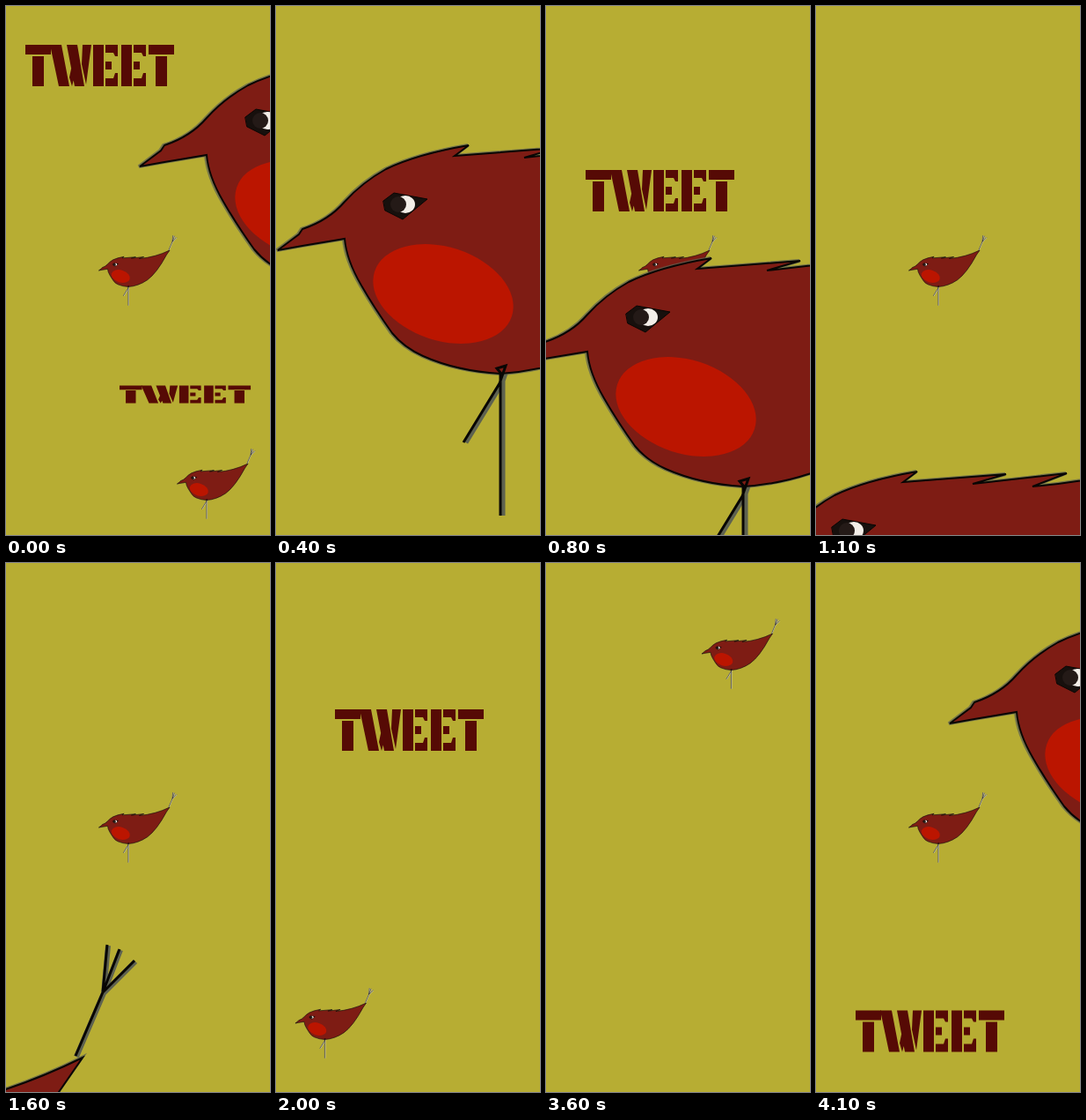
An HTML page that plays this animation: 300 by 600 pixels, repeating every 4600 ms.

```html
<!DOCTYPE html>
<html lang="en">
<head>
<meta charset="utf-8">
<title>Tweet</title>
<style>
  html, body { margin: 0; width: 100%; height: 100%; overflow: hidden; background: #b7ad33; }
  svg { display: block; width: 300px; height: 600px; }
  .big { --halo: #5e6250; --halo-w: 6px; --line: 2px; --limb: 3px; }
  .small { --halo: #cfccb8; --halo-w: 10px; --line: 4px; --limb: 4px; }
  #bird path { stroke-linejoin: round; stroke-linecap: round; }
  .limb { fill: none; stroke: #080604; stroke-width: var(--limb); }
  .halo { fill: none; stroke: var(--halo); stroke-width: var(--halo-w); }
  .word { fill: #560a05; }
</style>
</head>
<body>
<svg viewBox="0 0 300 600">
  <defs>
    <path id="body" d="M2 277 L26 259 L30 253 Q60 243 78 222 Q98 200 125 185 Q160 168 219 158
      L203 170 L320 161 L282 172 L389 160 L350 175 Q490 163 612 103
      L585 142 Q500 300 420 358 Q340 412 255 417 Q205 414 167 397 Q145 387 132 371
      Q112 343 97 317 Q80 288 78 264 L30 272 Z"/>
    <path id="legs" d="M256 417 L251 411 L261 408 L254 428 L213 495 M255 418 V578"/>
    <path id="tail" d="M604 101 L635 29 L640 -25 M635 29 L654 -20 M635 29 L671 -7"/>

    <!-- The beak tip is the bird's anchor point. -->
    <g id="bird" transform="translate(-2 -277)">
      <g class="halo">
        <use href="#legs" x="2.5"/><use href="#tail" x="1" y="1"/>
      </g>
      <use href="#body" x="-1" fill="none" stroke="#5e6250" stroke-width="4" opacity=".75"/>
      <use href="#body" fill="#7e1c14" stroke="#080604" style="stroke-width: var(--line)"/>
      <ellipse rx="82" ry="53" fill="#bb1500" transform="translate(190 326.5) rotate(18)"/>
      <path d="M122 221 L134 212 L172 219 L144 242 L124 232 Z" fill="#17100d" stroke="#080604"/>
      <ellipse cx="147" cy="225" rx="11" ry="10" fill="#f3eee8"/>
      <circle cx="139" cy="225" r="9" fill="#241a17"/>
      <use href="#legs" class="limb"/><use href="#tail" class="limb"/>
    </g>

    <path id="T" d="M0 0H29V11H0Z M8 13H21V47H8Z"/>
    <path id="W" d="M0 0H13L22 47H10Z M22 37L26 18L29 32L25 47Z
      M19 0H31L39 47H28Z M37 0H47L41 45L36 22Z"/>
    <path id="E" d="M0 0H12V47H0Z M14 0H28V13H25L23 9H14Z
      M14 19H21V28H14Z M14 38H23L25 32H28V47H14Z"/>
    <g id="tweet" role="img" aria-label="TWEET">
      <use href="#T"/><use href="#W" x="28"/><use href="#E" x="77"/>
      <use href="#E" x="109"/><use href="#T" x="140"/>
    </g>
  </defs>
  <g id="scene"></g>
</svg>
<script>
const LOOP = 4600;
const SMALL = 0.132;
const perch = [105.5, 300];

// Beak positions of the birds, top left corners of the words.
const steps = [
  { at: 0, big: [152, 182], small: [perch, [194.5, 542]], tall: [22, 44], wide: [129, 430.5] },
  { at: 200, big: [77, 230], small: [perch] },
  { at: 400, big: [2, 277], small: [perch] },
  { at: 500, big: [-6, 309], small: [perch] },
  { at: 600, big: [-14, 341], small: [perch], tall: [45, 46] },
  { at: 700, big: [-21, 373], small: [perch] },
  { at: 800, big: [-29, 405], small: [perch], tall: [45, 186] },
  { at: 900, big: [-53, 485], small: [perch], tall: [45, 177] },
  { at: 1000, big: [-78, 566], small: [perch] },
  { at: 1100, big: [-102, 647], small: [perch] },
  { at: 1200, big: [-192, 651], small: [perch] },
  { at: 1400, big: [-371, 660], small: [perch] },
  { at: 1600, big: [-523, 735], small: [perch] },
  { at: 1800, small: [[1, 440]] },
  { at: 2000, small: [[22, 522]], tall: [67, 166] },
  { at: 2200, small: [[194, 400]], tall: [45, 148] },
  { at: 2400, small: [[24, 65]] },
  { at: 2600, small: [[185.5, 464.5]], wide: [79, 280.5] },
  { at: 3100, tall: [45, 253] },
  { at: 3600, small: [[177, 103]] },
  { at: 4100, big: [152, 182], small: [perch], tall: [45, 507.5] },
];

const scene = document.getElementById("scene");

const place = (id, cls, pos, scale = "1") => pos
  ? `<use href="#${id}" class="${cls}" transform="translate(${pos}) scale(${scale})"/>`
  : "";

const draw = ({ big, small = [], tall, wide }) =>
  small.map(pos => place("bird", "small", pos, SMALL)).join("") +
  place("bird", "big", big) +
  place("tweet", "word", tall) +
  place("tweet", "word", wide, ".882 .425");

let shown;
function tick() {
  const time = performance.now() % LOOP;
  const step = steps.findLast(s => s.at <= time);
  if (step !== shown) {
    scene.innerHTML = draw(step);
    shown = step;
  }
  requestAnimationFrame(tick);
}
tick();
</script>
</body>
</html>
```
